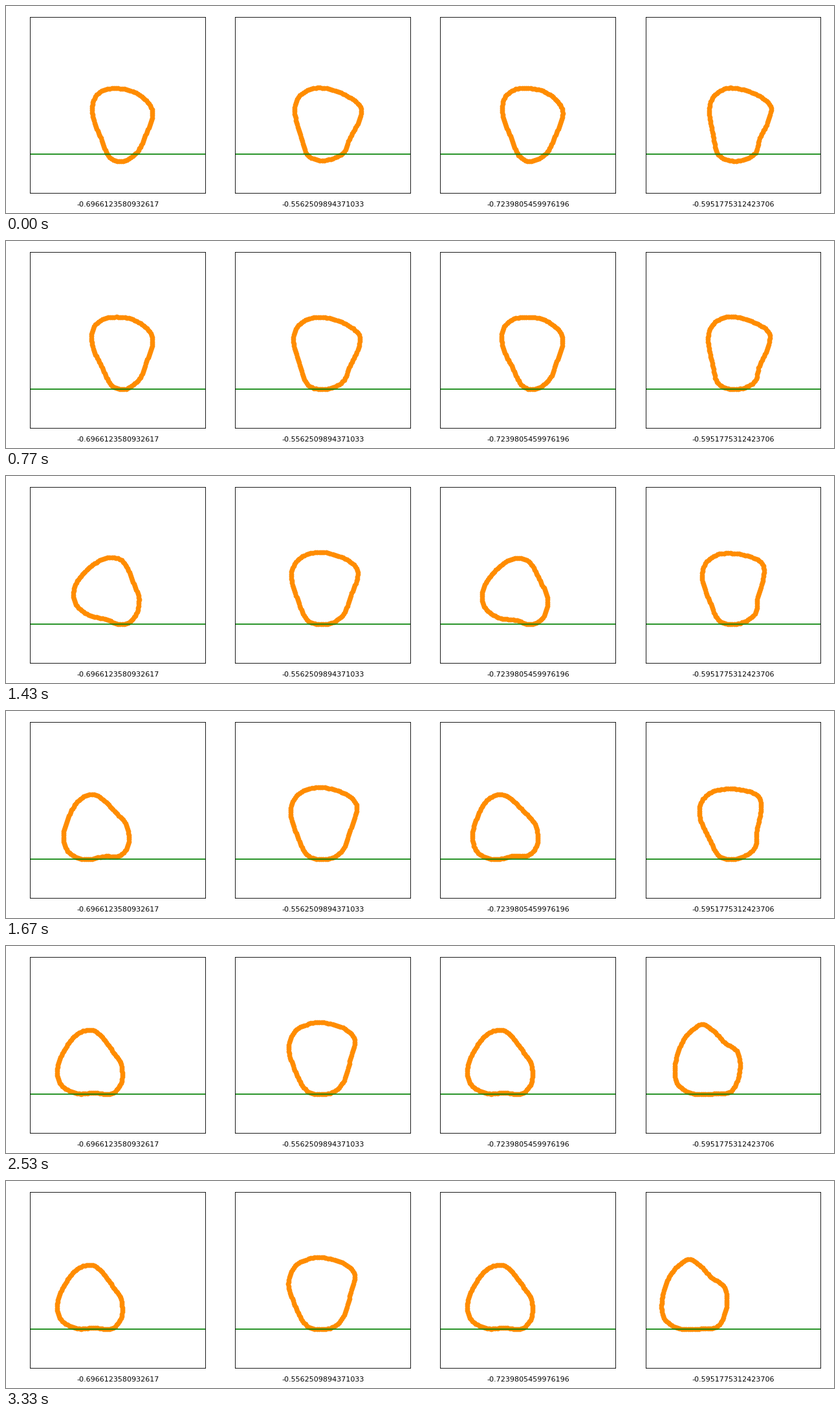
A matplotlib script that plays this animation: 1280 by 320 pixels, repeating every 3360 ms.

```python
import numpy as np
import matplotlib.pyplot as plt
from matplotlib.animation import FuncAnimation

W, H, DPI = 1280, 320, 80
LOOP, STEP = 3360, 30
LEFT, TOP, BOX_W, BOX_H, PITCH = 37.4, 16.8, 270.9, 272, 317.04
GROUND, REST = 229, 229.5
ANGLES = np.radians(np.arange(360))

# Each body: key points standing and after its roll (panel pixels, y down)
DROP = ([(173, 128), (200, 134), (222, 152), (227, 172), (216, 201), (203, 227),
         (180, 241), (160, 233), (147, 204), (135, 172), (136, 146), (151, 131)],
        [(134, 131), (149, 140), (165, 161), (180, 184), (180, 213), (164, 230),
         (140, 228), (110, 229), (86, 214), (82, 187), (96, 156), (114, 136)])
CUP = ([(173, 127), (203, 135), (230, 154), (230, 176), (215, 205), (204, 228),
        (175, 239), (150, 231), (140, 203), (130, 167), (134, 144), (151, 130)],
       [(171, 118), (205, 127), (222, 145), (216, 174), (206, 208), (189, 226),
        (161, 229), (143, 218), (128, 187), (120, 157), (130, 132), (150, 121)])
TOOTH = ([(175, 127), (205, 135), (231, 153), (228, 178), (215, 205), (206, 230),
          (177, 240), (151, 230), (143, 200), (137, 163), (143, 141), (157, 130)],
         [(126, 122), (144, 133), (160, 150), (180, 165), (183, 196), (170, 225),
          (145, 229), (112, 229), (88, 215), (83, 188), (92, 154), (108, 132)])

# Motion keys: time, roll in degrees, left edge
TOPPLE = [(0, 0, 133), (770, 4, 132), (1170, 20, 119), (1600, 70, 91.4),
          (1850, 77, 80), (2100, 71, 76.4), (2500, 65, 79)]
SETTLE = [(0, 0, 129), (2700, 10, 119.4)]
SLIDE = [(0, 0, 136), (770, 1.5, 134), (1170, 7, 128.5), (1670, 16, 120),
         (2070, 34, 108), (2530, 80, 82), (2950, 80, 62.3)]

# Label, body, motion, head start in ms, depth of the first overlap with the ground
PANELS = [("-0.6966123580932617", DROP, TOPPLE, 0, 11),
          ("-0.5562509894371033", CUP, SETTLE, 0, 9.2),
          ("-0.7239805459976196", DROP, TOPPLE, 35, 10.6),
          ("-0.5951775312423706", TOOTH, SLIDE, 0, 10.2)]


def spline(points, n=24):
    """Closed Catmull-Rom curve through the points."""
    b = np.array(points, float)[:, None]
    a, c, d = (np.roll(b, k, 0) for k in (1, -1, -2))
    u = np.linspace(0, 1, n, endpoint=False)[None, :, None]
    curve = b + .5 * u * (c - a + u * (2 * a - 5 * b + 4 * c - d + u * (3 * (b - c) + d - a)))
    return curve.reshape(-1, 2)


def centroid(p):
    q = np.roll(p, -1, 0)
    cross = p[:, 0] * q[:, 1] - q[:, 0] * p[:, 1]
    return ((p + q) * cross[:, None]).sum(0) / (3 * cross.sum())


def body_radius(points, roll):
    """Radius over angle, in the unrolled body frame."""
    p = spline(points)
    x, y = (p - centroid(p)).T
    return np.interp(ANGLES - np.radians(roll), np.arctan2(y, x), np.hypot(x, y),
                     period=2 * np.pi)


def ease(keys, t):
    """Monotone cubic through the keys, at rest at both ends."""
    k = np.array(keys, float)
    times, vals = k[:, 0], k[:, 1:]
    t = min(t, times[-1])
    dt = np.diff(times)[:, None]
    s = np.diff(vals, axis=0) / dt
    prod, total = s[:-1] * s[1:], s[:-1] + s[1:]
    m = np.zeros_like(vals)
    m[1:-1] = np.where(prod > 0, 2 * prod / np.where(total == 0, 1, total), 0)
    i = min(np.searchsorted(times, t, "right") - 1, len(dt) - 1)
    h, u = dt[i], (t - times[i]) / dt[i]
    return ((1 + 2 * u) * (1 - u) ** 2 * vals[i] + u * (1 - u) ** 2 * h * m[i]
            + u * u * (3 - 2 * u) * vals[i + 1] + u * u * (u - 1) * h * m[i + 1])


def dots(curve, n=100):
    """Points spaced evenly along a closed curve."""
    p = np.vstack([curve, curve[:1]])
    dist = np.r_[0, np.cumsum(np.hypot(*np.diff(p, axis=0).T))]
    at = np.linspace(0, dist[-1], n, endpoint=False)
    return np.column_stack([np.interp(at, dist, p[:, 0]), np.interp(at, dist, p[:, 1])])


class Body:
    def __init__(self, marks, shapes, keys, lead, sink):
        self.marks, self.keys, self.lead, self.sink = marks, keys, lead, sink
        self.full = keys[-1][1]
        self.start = body_radius(shapes[0], 0)
        self.end = body_radius(shapes[1], self.full)

    def pose(self, t):
        """Roll, deform with the roll, and rest on the ground."""
        roll, left = ease(self.keys, t + self.lead)
        w = min(roll / self.full, 1)
        r = (1 - w) * self.start + w * self.end
        a = ANGLES - np.radians(roll)
        p = np.column_stack([r * np.cos(a), r * np.sin(a)])
        bottom = REST + self.sink * np.exp(-t / 35)
        self.marks.set_offsets(dots(p + [left - p[:, 0].min(), bottom - p[:, 1].max()]))


fig = plt.figure(figsize=(W / DPI, H / DPI), dpi=DPI, facecolor="white")
bodies = []
for n, (label, shapes, keys, lead, sink) in enumerate(PANELS):
    x = LEFT + n * PITCH
    ax = fig.add_axes([x / W, 1 - (TOP + BOX_H) / H, BOX_W / W, BOX_H / H])
    ax.set(xlim=(LEFT, LEFT + BOX_W), ylim=(TOP + BOX_H, TOP), xticks=[], yticks=[])
    ax.axhline(GROUND, color="green", lw=1.5)
    fig.text((x + BOX_W / 2) / W, 9.5 / H, label, ha="center", va="baseline",
             fontsize=10, family="DejaVu Sans")
    marks = ax.scatter([], [], s=36, color="darkorange", zorder=1)
    bodies.append(Body(marks, shapes, keys, lead, sink))


def update(frame):
    for body in bodies:
        body.pose(frame * STEP)
    return [body.marks for body in bodies]


anim = FuncAnimation(fig, update, frames=LOOP // STEP, interval=STEP,
                     repeat=True, repeat_delay=0, blit=False)
plt.show()
```
